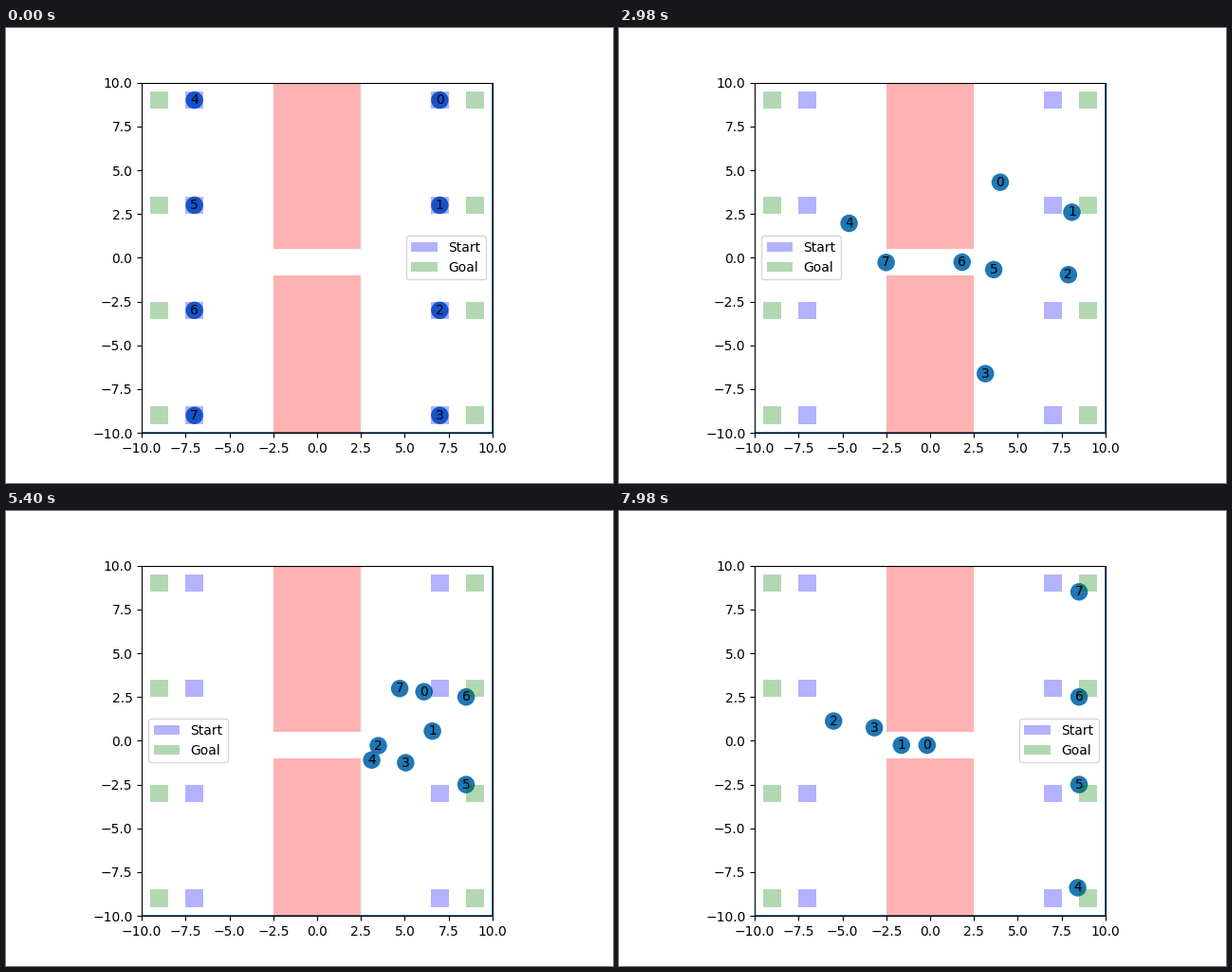
These frames come from a looping animation (640 px wide and 480 px high, 8000 ms). A matplotlib script:

```python
import numpy as np
import matplotlib.pyplot as plt
from matplotlib.animation import FuncAnimation
from matplotlib.patches import Circle, Rectangle

LOOP_MS, STEP_MS = 8000, 25
ROWS = (9, 3, -3, -9)
STARTS = [(x, y) for x in (7, -7) for y in ROWS]
GOALS = [(x, y) for x in (-9, 9) for y in ROWS]

GAP_X, GAP_Y = 2.5, -0.25
CROSS_S = 1.3   # seconds an agent takes through the gap
PACE = 3.5      # units per second on the way to the goal

# When each agent enters the gap, in seconds
SLOTS = (7.28, 6.9, 5.73, 6.33, 3.8, 1.33, 1.85, 2.98)
# Manoeuvres while giving way: (time, x, y)
WAITS = {
    0: [(1.4, 4.1, 5.2), (3, 4, 4.3), (4.3, 5.2, 5.05), (4.8, 6, 4.2), (6, 6.2, 1.4)],
    1: [(3, 8.1, 2.6), (4, 8.4, 1.9), (4.75, 8.35, 0.9)],
    2: [(3, 7.9, -0.95), (4.1, 7.4, -0.4)],
    3: [(1.1, 3.6, -8.4), (3.2, 3.1, -6.4), (4.8, 6.7, -1.9)],
    4: [(1.7, -7.9, 5.4)],
    6: [(1.1, -4.6, -0.1)],
}


def track(agent, t):
    """Start, give way, cross the gap, then head straight for the mirrored goal."""
    x, y = STARTS[agent]
    side, enter = np.sign(x), SLOTS[agent]
    leave = enter + CROSS_S
    goal = -side * 8.5, -np.sign(y) * (abs(y) - 0.5)
    run = np.hypot(goal[0] + side * GAP_X, goal[1] - GAP_Y) / PACE
    points = [(0, x, y), *WAITS.get(agent, []),
              (enter, side * GAP_X, GAP_Y), (leave, -side * GAP_X, GAP_Y),
              (leave + run, *goal)]
    times, xs, ys = zip(*points)
    return np.column_stack((np.interp(t, times, xs), np.interp(t, times, ys)))


n_frames = LOOP_MS // STEP_MS
clock = np.arange(n_frames) * STEP_MS / 1000
tracks = [track(agent, clock) for agent in range(len(STARTS))]

fig, ax = plt.subplots(figsize=(6.4, 4.8), dpi=100)
ax.set_aspect("equal")
ax.set_xlim(-10, 10)
ax.set_ylim(-10, 10)


def box(x, y, w, h, **style):
    return ax.add_patch(Rectangle((x, y), w, h, **style))


# Thin walls on the right and bottom
box(9.95, -10, 0.05, 20)
box(-10, -10, 20, 0.05)

discs = [ax.add_patch(Circle(p, 0.5)) for p in STARTS]
tags = [ax.text(*p, str(i), ha="center", va="center") for i, p in enumerate(STARTS)]

for y, h in ((0.5, 9.5), (-10, 9)):
    box(-GAP_X, y, 2 * GAP_X, h, color="red", alpha=0.3, lw=0)
for spots, color, name in ((STARTS, "blue", "Start"), (GOALS, "green", "Goal")):
    for i, (x, y) in enumerate(spots):
        box(x - 0.5, y - 0.5, 1, 1, color=color, alpha=0.3, lw=0,
            label=name if i == 0 else None)
# The legend moves to whichever side is free of agents
ax.legend(loc="best")


def update(i):
    for disc, tag, path in zip(discs, tags, tracks):
        disc.center = path[i]
        tag.set_position(path[i])
    return discs + tags


anim = FuncAnimation(fig, update, frames=n_frames, interval=STEP_MS, repeat=True)
plt.show()
```
